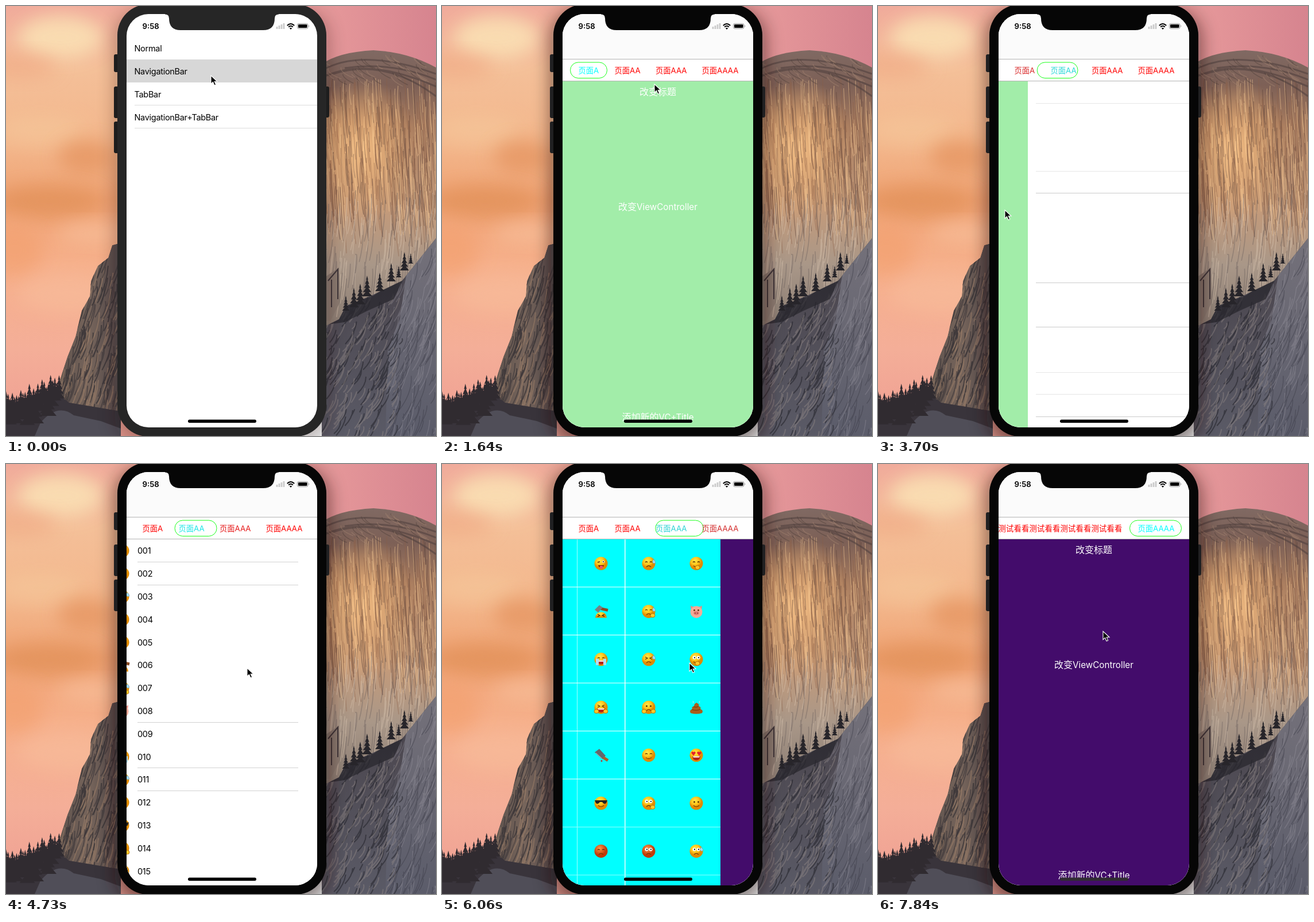
An HTML page that plays this animation: 749 by 748 pixels, repeating every 7.99 s.

```html
<!DOCTYPE html>
<html lang="zh">
<head>
<meta charset="utf-8">
<title>Pager demo</title>
<style>
html, body { margin: 0; width: 100%; height: 100%; overflow: hidden; }
svg { display: block; width: 100vw; height: 100vh; }
text { font-family: Inter, "Noto Sans CJK SC", "Noto Sans CJK", "Noto Sans CJK JP", sans-serif; }
.cell { font-size: 14.5px; letter-spacing: -.3px; }
.tab { font-size: 13.3px; }
.label { font-size: 16px; font-weight: 300; fill: #fff; text-anchor: middle; }
.latin { font-size: 15.2px; font-weight: 400; }
</style>
</head>
<body>
<svg viewBox="0 0 749 748" preserveAspectRatio="none">
  <defs>
    <linearGradient id="sky" x2="0" y2="1">
      <stop offset="0" stop-color="#f0aa9b"/><stop offset=".15" stop-color="#f4bf98"/>
      <stop offset=".32" stop-color="#f3b78c"/><stop offset=".45" stop-color="#efa273"/>
      <stop offset=".6" stop-color="#f6b08b"/><stop offset=".8" stop-color="#f4ae98"/>
      <stop offset="1" stop-color="#ee9d92"/>
    </linearGradient>
    <linearGradient id="pink"><stop stop-color="#f3a9a3"/><stop offset="1" stop-color="#d6848f"/></linearGradient>
    <linearGradient id="dome" x2="0" y2="1">
      <stop offset="0" stop-color="#806a64"/><stop offset=".1" stop-color="#7d6056"/>
      <stop offset=".2" stop-color="#a57a5e"/><stop offset=".42" stop-color="#c39a7a"/>
      <stop offset=".56" stop-color="#a99788"/><stop offset=".75" stop-color="#85786f"/>
    </linearGradient>
    <linearGradient id="cliff">
      <stop stop-color="#4e4644"/><stop offset=".6" stop-color="#77655b"/><stop offset="1" stop-color="#51484a"/>
    </linearGradient>
    <linearGradient id="slope" x2="0" y2="1"><stop stop-color="#484249"/><stop offset="1" stop-color="#5a5a66"/></linearGradient>
    <linearGradient id="granite" x2="0" y2="1"><stop stop-color="#74717a"/><stop offset="1" stop-color="#5b5c6a"/></linearGradient>
    <radialGradient id="glow"><stop stop-color="#ffc88a" stop-opacity=".85"/><stop offset="1" stop-color="#ffb870" stop-opacity="0"/></radialGradient>
    <radialGradient id="yellow" cx=".4" cy=".3"><stop stop-color="#ffe94a"/><stop offset=".6" stop-color="#ffc51c"/><stop offset="1" stop-color="#e08a00"/></radialGradient>
    <radialGradient id="red" cx=".4" cy=".3"><stop stop-color="#ff9a48"/><stop offset="1" stop-color="#c23a08"/></radialGradient>
    <filter id="soft" x="-50%" y="-50%" width="200%" height="200%"><feGaussianBlur stdDeviation="16"/></filter>
    <clipPath id="screen"><rect x="210" y="14" width="332" height="719" rx="38"/></clipPath>
    <clipPath id="domeClip"><path d="M550 101Q580 80 640 77Q700 80 749 107V748H550Z"/></clipPath>
    <clipPath id="cliffClip"><path id="cliffShape" d="M200 412L185 416L178 438L160 452L148 478L146 505L132 530L121 575L107 610L90 662L70 700L60 748H200Z"/></clipPath>
    <clipPath id="slopeClip"><path d="M550 560L580 545L592 522L640 502L690 478L749 404V748H550Z"/></clipPath>
  </defs>
  <g id="photo"></g>
  <rect id="shadow" x="190" y="6" width="372" height="760" rx="50" fill="#201010" filter="url(#soft)"/>
  <g id="body">
    <path id="keys" d="M188 87q0-3 3-3h5v31h-5q-3 0-3-3zM188 143q0-3 3-3h5v55h-5q-3 0-3-3zM188 204q0-3 3-3h5v55h-5q-3 0-3-3zM556 140h4q3 0 3 3v48q0 3-3 3h-4z"/>
    <rect x="194" y="-3" width="364" height="752" rx="54"/>
  </g>
  <g clip-path="url(#screen)">
    <rect x="210" y="14" width="332" height="719" fill="#fff"/>
    <g id="menu"></g>
    <g id="pager">
      <rect x="210" y="14" width="332" height="719" fill="#fff"/>
      <g id="pages"></g>
      <rect x="210" y="14" width="332" height="79" fill="#fbfbfb"/>
      <rect x="210" y="93" width="332" height="37" fill="#fff"/>
      <path d="M210 92.5H542M210 130.5H542" stroke="#b4b4b4"/>
      <rect id="pill" y="98" height="27.5" rx="13.7" fill="none" stroke="#1bff1b"/>
      <g id="tabs"></g>
    </g>
    <rect id="home" x="317" y="719.5" width="119" height="5.5" rx="2.7"/>
    <text x="237.5" y="39.6" font-size="13.2" font-weight="600">9:58</text>
    <path d="M472 36v4M476 34v6M480 32v8M484 30v10" stroke="#cbcbcb" stroke-width="2.8"/>
    <path d="M489.8 34q6.2-6 12.4 0M492.2 36.6q3.8-3.6 7.6 0" fill="none" stroke="#000" stroke-width="2"/>
    <path d="M496 41l-2.2-2.4q2.2-1.8 4.4 0z"/>
    <rect x="507.5" y="30.5" width="18.5" height="9" rx="2.6" fill="none" stroke="#999"/>
    <rect x="509" y="32" width="15.5" height="6" rx="1.3"/><path d="M527.4 33.3q2 1.7 0 3.4z" fill="#999"/>
  </g>
  <path id="notch" d="M277 13h198v1.5q-7 0-7 7q0 20.500-20 20.500H304q-20 0-20-20.500q0-7-7-7z"/>
  <path id="cursor" d="M0 0V14.500L3.500 11.200L6 17L8.600 15.900L6.200 10.300H11Z" stroke="#fff" stroke-width="1.100"/>
</svg>
<script>
const LOOP = 7990, STEPS = 54, WIDTH = 332, LEFT = 210;
const $ = id => document.getElementById(id);

let seed = 7;
const rnd = (a, b) => {
  seed = (seed * 16807) % 2147483647;
  return a + (b - a) * seed / 2147483647;
};

// Vertical rock streaks gathered into one path per colour
function streaks(count, colors, x0, x1, y0, y1, len, lean, width) {
  return colors.map(color => {
    let d = '';
    for (let i = 0; i < count; i++) {
      const l = rnd(len / 4, len), k = rnd(-3, 3);
      d += `M${rnd(x0, x1).toFixed(1)} ${rnd(y0, y1).toFixed(1)}q${k.toFixed(1)} ${(l / 2).toFixed(1)} ${(lean * l).toFixed(1)} ${l.toFixed(1)}`;
    }
    return `<path d="${d}" fill="none" stroke="${color}" stroke-width="${width}"/>`;
  }).join('');
}

function tree(x, y, h) {
  let d = `M${x} ${y}`;
  for (let i = 1; i <= 5; i++) {
    const w = h * .05 * i, yy = y + h * i / 5;
    d += `L${x + w} ${yy}L${x + w * .4} ${yy}`;
  }
  for (let i = 5; i >= 1; i--) {
    const w = h * .05 * i, yy = y + h * i / 5;
    d += `L${x - w * .4} ${yy}L${x - w} ${yy}`;
  }
  return d + 'Z';
}

function drawPhoto() {
  const clouds = [
    [95, 55, 75, 38, '#fae0b4', .9], [20, 105, 70, 22, '#f0a883', .6], [60, 215, 75, 24, '#f5c69a', .7],
    [140, 262, 50, 30, '#e59460', .75], [75, 340, 95, 28, '#e2925a', .8], [160, 395, 70, 18, '#f7bd99', .8],
    [15, 425, 50, 45, '#f3a06f', .7], [110, 500, 90, 35, '#f8bd9c', .6]
  ].map(([x, y, rx, ry, c, o]) =>
    `<ellipse cx="${x}" cy="${y}" rx="${rx}" ry="${ry}" fill="${c}" opacity="${o}" filter="url(#soft)"/>`).join('');
  let leftTrees = '', ridgeTrees = '';
  for (let i = 0; i < 26; i++) leftTrees += tree(i * 3.7, 680 - i * 1.4 + rnd(-10, 10), rnd(30, 60));
  [[592, 504, 26], [606, 490, 34], [617, 483, 36], [629, 469, 36], [651, 464, 32], [671, 447, 32], [684, 452, 20], [694, 428, 32], [705, 430, 18]]
    .forEach(p => ridgeTrees += tree(...p));
  $('photo').innerHTML = `
    <rect width="400" height="748" fill="url(#sky)"/>${clouds}
    <rect x="400" width="349" height="200" fill="url(#pink)"/>
    <g clip-path="url(#domeClip)">
      <rect x="550" y="70" width="199" height="678" fill="url(#dome)"/>
      <ellipse cx="620" cy="250" rx="100" ry="125" fill="url(#glow)"/>
      ${streaks(130, ['#5a403880', '#ffd29a70', '#8b5f4670'], 552, 749, 125, 330, 110, .06, 1.2)}
      ${streaks(80, ['#6b605f70', '#d8c5b070'], 552, 749, 320, 490, 80, -.1, 1.5)}
      <path d="M550 112Q620 72 749 118M550 125Q625 86 749 140M570 118Q660 90 749 157M590 108Q670 96 749 128" fill="none" stroke="#4d3e3d" stroke-opacity=".55" stroke-width="3"/>
      ${streaks(25, ['#51403b80', '#a3847180'], 555, 740, 84, 125, 20, 1.2, 1.3)}
      <path d="M558 470L580 455L582 515L565 548H558Z" fill="#8a7b71"/>
      <path d="M561 478l17-20v52M567 476v48" fill="none" stroke="#3f373a" stroke-width="2"/>
    </g>
    <g clip-path="url(#slopeClip)">
      <rect x="550" y="400" width="199" height="348" fill="url(#slope)"/>
      <path d="M749 404L697 468L686 545L665 600L661 748H749Z" fill="url(#granite)"/>
      ${streaks(110, ['#25242c90', '#92898670'], 555, 690, 500, 740, 40, -.5, 2)}
      ${streaks(70, ['#3a394470', '#a3a0a850'], 675, 755, 415, 740, 65, -.35, 1.4)}
      <path d="M552 555L590 522L640 504L697 465L675 510L630 530L590 550Z" fill="#29272e" opacity=".75"/>
    </g>
    <path d="${ridgeTrees}" fill="#27252a"/>
    <g clip-path="url(#cliffClip)">
      <use href="#cliffShape" fill="url(#cliff)"/>
      ${streaks(110, ['#2b282d99', '#a1826a80', '#39343890'], 60, 205, 415, 735, 65, -.28, 2)}
    </g>
    <path d="M0 697L30 683L80 668L110 690L200 705V748H0Z" fill="#39343b"/>
    <path d="M60 725Q90 690 118 712L165 722L200 735V748H50Z" fill="#504e58"/>
    <path d="${leftTrees}" fill="#302b30"/>`;
}

const line = (d, color, w = 1) => `<path d="${d}" fill="none" stroke="${color}" stroke-width="${w}"/>`;
const dot = (x, y, r, c) => `<circle cx="${x}" cy="${y}" r="${r}" fill="${c}"/>`;

const eyes = {
  o: dot(-3.5, -2, 1.4, '#532c00') + dot(3.5, -2, 1.4, '#532c00'),
  k: line('M-6-2l4-1', '#532c00', 1.4) + dot(4, -3, 2, '#fff') + dot(4, -3, 1, '#000'),
  '-': line('M-6-2q2-2 4 0M2-2q2-2 4 0', '#532c00', 1.2),
  '>': line('M-6-4l4 2l-4 2M6-4l-4 2l4 2', '#532c00', 1.2),
  w: dot(-3.5, -3, 3, '#fff') + dot(3.5, -3, 3, '#fff') + dot(-3, -3, 1.1, '#000') + dot(4, -3, 1.1, '#000'),
  h: '<path d="M-5 1l-4-5q2-4 4-1q2-3 4 1zM5 1l-4-5q2-4 4-1q2-3 4 1z" fill="#e3202c"/>',
  s: '<path d="M-11-5H11L9 0Q5 3 2-2H-2Q-5 3-9 0Z" fill="#222"/>'
};
const mouths = {
  s: line('M-5 4q5 4 10 0', '#753a00', 1.2),
  f: line('M-4 6q4-4 8 0', '#753a00', 1.2),
  t: '<path d="M-5 3H5Q4 7 0 7T-5 3Z" fill="#712000"/><path d="M-2 4h5v4q-2 3-5 0z" fill="#f0506b"/>',
  g: '<path d="M-7 2H7Q6 9 0 9T-7 2Z" fill="#b52013"/><path d="M-6 2H6L5 4H-5Z" fill="#fff"/>'
};
const hand = x => `<ellipse cx="${x}" cy="7" rx="4" ry="3.5" fill="#ffc828" stroke="#a86400" stroke-width=".8"/>`;
const extras = {
  d: '<path d="M8-7q6 5 2 7q-5 0-2-7z" fill="#a6dcff" stroke="#519ac8" stroke-width=".6"/>',
  c: hand(2), h: hand(7), H: hand(-8) + hand(8),
  T: '<path d="M-9-1h5v11h-5zM4-1h5v11h-5z" fill="#b1ddf5"/>'
};
const special = {
  hammer: '<path d="M-10 11Q-9 1 0 1T10 11Z" fill="url(#yellow)"/>' + line('M-6 5l4 2l-4 2M6 5l-4 2l4 2', '#532c00', 1.2) +
    line('M-1-5L12-2', '#8a4b23', 5) + '<path d="M-11-3L-3-11L3-7L-5 2Z" fill="#788083"/>',
  pig: '<path d="M-10-10l7 3h6l7-3l-1 8H-9z" fill="#e78c82"/>' + dot(0, 1, 10.5, '#f5aa98') + eyes.o +
    '<ellipse cy="3" rx="5" ry="3.500" fill="#e57f76"/>' + dot(-2, 3, 1, '#8c3530') + dot(2, 3, 1, '#8c3530'),
  poo: '<path d="M0-8Q6-6 4-2Q9-1 7 3Q13 5 10 10Q0 13-10 10Q-13 5-7 3Q-9-1-4-2Q-4-6 0-8Z" fill="#a95e1c"/>' +
    line('M-5-1q6 2 9-1M-8 4q10 3 15-1', '#6e3608') + line('M-6-11q2 2 0 4M6-11q-2 2 0 4', '#d7e0dc'),
  knife: '<path d="M-11-5L-3-11L8 1L2 7Z" fill="#62696b"/>' + line('M4 4L12 9', '#aa6028', 5) + line('M-9-4L2 6', '#b9c0c1') + dot(1, 10, 1.4, '#d01d1d'),
  blank: dot(-1, 0, 8, 'url(#yellow)')
};
const faces = ('os kt -fd -sc os hammer -fdh pig blank -gT >fd wsc ss >gH ofH poo ' +
  'os knife -s hg os ss wfh os os !-f !wf wfd').split(' ');

function emoji(code, x, y) {
  let art = special[code];
  if (!art) {
    const angry = code[0] === '!', [eye, mouth, ...more] = angry ? code.slice(1) : code;
    art = dot(0, 0, 11.5, `url(#${angry ? 'red' : 'yellow'})`) + eyes[eye] + mouths[mouth] + more.map(k => extras[k]).join('');
  }
  return `<g transform="translate(${x} ${y})">${art}</g>`;
}

const latin = s => `<tspan class="latin">${s}</tspan>`;
const label = (y, s) => `<text class="label" x="166" y="${y}">${s}</text>`;
const buttonPage = (n, color) => `<g transform="translate(${n * WIDTH})">
  <rect y="131" width="332" height="602" fill="${color}"/>
  ${label(154.5, '改变标题')}${label(355, '改变' + latin('ViewController'))}${label(720.5, '添加新的' + latin('VC+Title'))}</g>`;

function drawPages() {
  const rowsY = i => 151 + i * 39.8;
  const hr = (x, ys, c) => line(ys.map(y => `M${x} ${y}H332`).join(''), c);
  let rows = hr(52, [170.5, 210.5, 449.5, 528.5, 568.5], '#d2d2d2');
  for (let i = 0; i < 15; i++) {
    rows += `<text class="cell" x="52" y="${rowsY(i) + 5.3}">${String(i + 1).padStart(3, '0')}</text>` + emoji(faces[i], 26, rowsY(i));
  }
  let grid = '<rect y="131" width="332" height="602" fill="#0ff"/>';
  grid += line('M82.500 131V733', '#a8ffff') + line('M165.800 131V733', '#fff', 1.4);
  for (let r = 1; r < 8; r++) grid += line(`M0 ${130.5 + r * 83.5}H332`, r < 6 ? '#fff' : '#90ffff', 1.2);
  faces.forEach((f, i) => grid += emoji(f, 41 + i % 4 * 83, 173 + (i >> 2) * 83.4));
  $('pages').innerHTML = buttonPage(0, '#a2eda9') +
    `<g transform="translate(332)"><g id="empty">${hr(14, [169.5, 287.5, 637.5, 675.5], '#e6e6e6')}${hr(14, [325.5, 481.5, 558.5, 714.5], '#cbcbcb')}</g><g id="rows">${rows}</g></g>` +
    `<g id="grid" transform="translate(664)">${grid}</g>` + buttonPage(3, '#430c6b');
}

const tabs = [['页面A', 237.5, 223.5, 287.5], ['页面AA', 300.5, 287, 359], ['页面AAA', 372, 358, 440], ['页面AAAA', 452.5, 438.5, 528.5]];

function drawChrome() {
  $('menu').innerHTML = '<rect x="210" y="93" width="332" height="40" fill="#d7d7d7"/>' + line('M224 172.500H542M224 212.500H542', '#dcdcdc') +
    ['Normal', 'NavigationBar', 'TabBar', 'NavigationBar+TabBar'].map((s, i) =>
      `<text class="cell" x="223.5" y="${78.5 + i * 40}">${s}</text>`).join('');
  $('tabs').innerHTML = tabs.map(([s, x]) => `<text class="tab" x="${x}" y="116.7">${s}</text>`).join('') +
    `<text class="tab" x="425.5" y="116.7" text-anchor="end" fill="#f00" id="longTab" style="letter-spacing:.2px">${'测试看看'.repeat(4)}</text>`;
}

// Linear interpolation through [step, value...] keys
function track(keys, s, col = 1) {
  if (s <= keys[0][0]) return keys[0][col];
  for (let i = 1; i < keys.length; i++) {
    const a = keys[i - 1], b = keys[i];
    if (s <= b[0]) return a[col] + (b[col] - a[col]) * (s - a[0]) / (b[0] - a[0]);
  }
  return keys[keys.length - 1][col];
}

const push = [[5, 0], [6, .3], [7, .78], [8, .96], [9, 1]];
const scroll = [[16, 0], [17, 10], [18, 44], [21, 150], [25, 281], [26, 325], [27, 332], [30, 332], [31, 335], [32, 365],
  [35, 560], [36, 640], [37, 664], [39, 664], [40, 668], [41, 721], [42, 860], [43, 960], [44, 990], [45, 996]];
const pointer = [[0, 357, 121], [1, 357, 120], [2, 357, 119.5], [5, 357, 119.5], [8, 360, 124], [11, 370, 136], [14, 400, 220], [17, 453, 358],
  [18, 419, 360], [21, 330, 358], [24, 228, 355], [25, 221, 355], [26, 260, 354], [28, 537, 352], [30, 470, 354],
  [31, 450, 355], [32, 420, 355], [35, 232, 353], [36, 209, 352], [38, 400, 348], [40, 484, 345], [41, 431, 346],
  [42, 250, 343], [43, 81, 340], [44, 165, 300], [45, 250, 240], [47, 374, 148], [49, 374, 148], [53, 392, 291]];

const show = (id, on) => $(id).setAttribute('visibility', on ? 'visible' : 'hidden');
const move = (id, x, y = 0) => $(id).setAttribute('transform', `translate(${x} ${y})`);

function render(ms) {
  const s = Math.min(STEPS - 1, Math.floor((ms + 10) * STEPS / LOOP));
  const active = s >= 6, p = track(push, s), offset = track(scroll, s), at = offset / WIDTH;
  $('body').setAttribute('fill', active ? '#060606' : '#262626');
  $('notch').setAttribute('fill', active ? '#060606' : '#262626');
  $('keys').setAttribute('fill', active ? '#202022' : '#1d1d1d');
  $('shadow').setAttribute('opacity', active ? .55 : .3);
  move('menu', -.3 * WIDTH * p);
  move('pager', WIDTH * (1 - p));
  show('pager', p > 0);
  show('menu', p < 1);
  move('pages', LEFT - offset);
  show('empty', s < 27);
  show('rows', s >= 27);
  show('grid', s >= 38);

  const i = Math.min(2, Math.floor(at)), f = at - i;
  const mix = col => tabs[i][col] + (tabs[i + 1][col] - tabs[i][col]) * f;
  $('pill').setAttribute('x', mix(2));
  $('pill').setAttribute('width', mix(3) - mix(2));
  const renamed = s >= 49;
  tabs.forEach((_, n) => {
    const on = Math.max(0, 1 - Math.abs(at - n)), c = Math.round(255 * on), el = $('tabs').children[n];
    el.setAttribute('fill', `rgb(${255 - c},${c},${c})`);
    el.setAttribute('visibility', renamed && n < 3 ? 'hidden' : 'inherit');
  });
  $('longTab').setAttribute('visibility', renamed ? 'inherit' : 'hidden');
  const g = track([[45, 0], [53, 1]], s);
  $('home').setAttribute('fill', `rgb(${48 * g},${44 * g},${50 * g})`);
  move('cursor', track(pointer, s), track(pointer, s, 2));
}

drawPhoto();
drawPages();
drawChrome();
const start = performance.now();
(function tick() {
  render((performance.now() - start) % LOOP);
  requestAnimationFrame(tick);
})();
</script>
</body>
</html>
```
